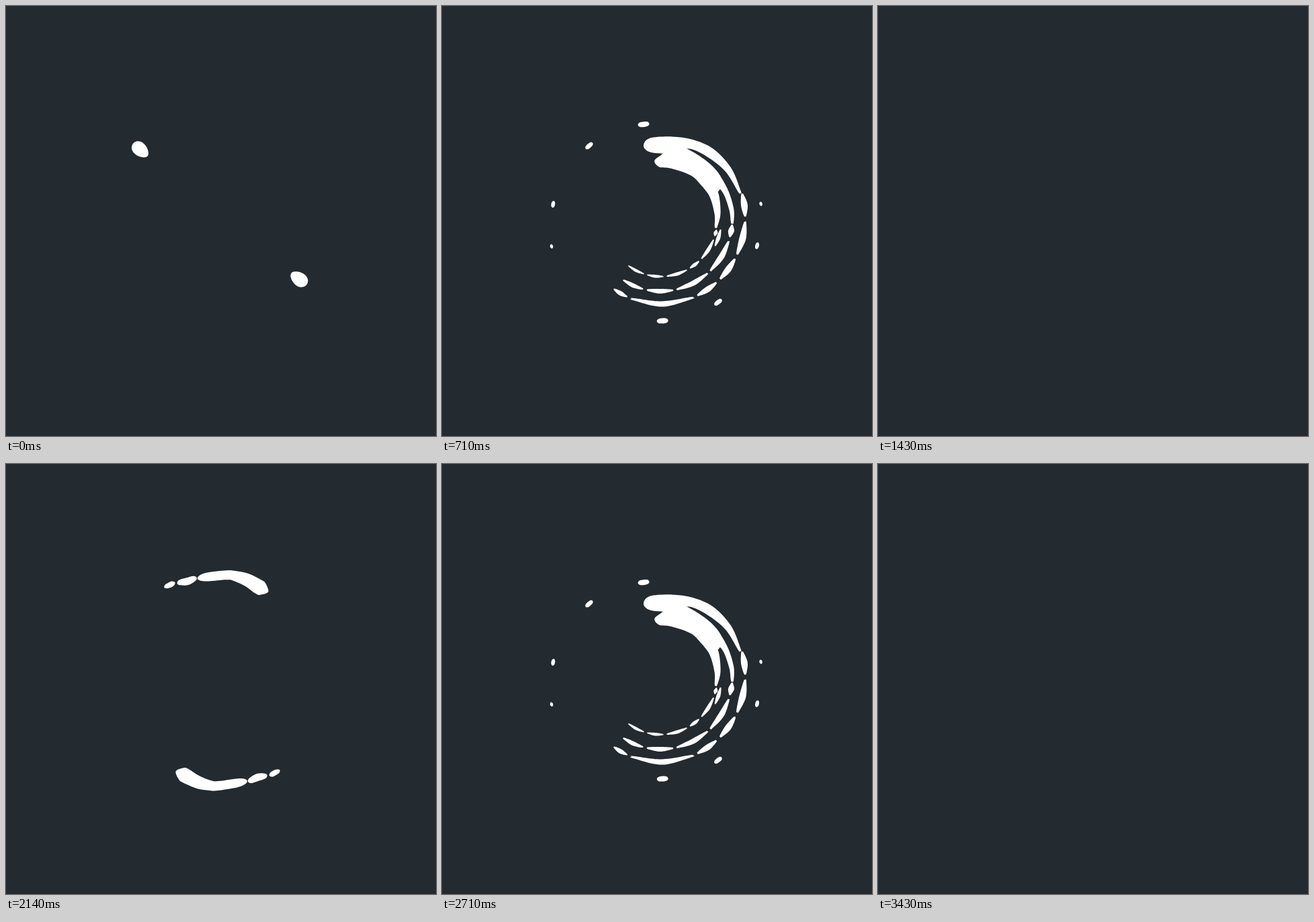
An HTML page for the animation above (4 s loop, 640 by 640 pixels).

```html
<!DOCTYPE html>
<html lang="en">
<head>
<meta charset="utf-8">
<title>Ink swirl</title>
<style>
  html, body { margin: 0; width: 100%; height: 100%; overflow: hidden; background: #232a30; }
  svg { display: block; width: 100%; height: 100%; }
</style>
</head>
<body>
<svg viewBox="0 0 640 640"><path id="ink" fill="#fff"/></svg>
<script>
const CX = 318, CY = 322, RAD = Math.PI / 180;
const LOOP = 2000, RATE = 14, LAST = 20;
const OPPOSITE = 183;

const polar = (deg, r) => [CX + r * Math.cos(deg * RAD), CY + r * Math.sin(deg * RAD)];

// A ribbon is a bent streak: key points of angle, radius and width.
const ribbon = text => text.split(',').map(p => p.trim().split(' ').map(Number));

// A spiral ring that breaks into tapered dashes at the given angles.
const ring = (radius, width, gap, cuts) => cuts.slice(1).map((end, i) => {
  const from = cuts[i] + gap / 2, to = end - gap / 2;
  const w = width * (1 - Math.max(0, from) / 350);
  return [[from, .4], [(from + to) / 2, 1], [to, .4]].map(([deg, k]) => [deg, radius - .13 * deg, w * k]);
});

const brush = { ref: 78, ribbons: [
  ribbon('80 111.5 15, 95 107 28, 120 102 36, 140 101 33, 156 107 18, 180 113 10, 194 115 8, 205 115 4'),
  ribbon('89 87 16, 106 84 24, 130 88 34, 150 86 29, 159 79 16, 168 75 8, 185 73 5, 200 76 4, 209 75.5 2.5'),
  ribbon('145 98 24, 157 94 20, 168 94 8, 182 94 6, 196 95.5 8, 210 97 4.5'),
  ribbon('170 81.5 3, 176 81.5 4, 182 81.5 3'),
  ribbon('209 82.5 2.5, 211 82.5 2.5')
] };

const swirl = { ref: -98, ribbons: [
  ribbon('-94 115 21, -79 117.5 25, -66 127.5 15, -52 131.5 15, -36 133.5 10, -20 133 4'),
  ribbon('-86 91 17, -74 101 35, -52 103 31, -34 103.5 29'),
  ribbon('-40 110 16, -25 113.5 9, -10 114.5 7, 0 114 4'),
  ribbon('-40 97 17, -25 96 14, -8 93 9, 4 90 4'),
  ...ring(133, 10, 5, [-20, -2, 23, 43, 62, 109, 124]),
  ...ring(114, 9, 5, [0, 13, 43, 74, 99, 121]),
  ...ring(92, 6, 5, [5, 15, 40, 55, 80, 101, 124]),
  ...ring(98, 6, 4, [5, 23])
] };

const drop = { ref: 212, ribbons: [
  ribbon('158.5 149 8, 165 149 13, 180 151 14, 186 151 15, 196 149 19, 207 145 22, 211 144.5 19'),
  ribbon('142 151 8, 148 149 11, 154 150 8'),
  ribbon('131 154.5 6, 134 154 8, 137 154 7')
] };

const flecks = { ref: 0, ribbons: [263, 229, 190, 167].map((deg, i) => {
  const half = 2 - .5 * i;
  return [[deg - half, 147 + 4 * i, 7 - i], [deg + half, 147 + 4 * i, 7 - i]];
}) };

function smooth(points) {
  const n = points.length, at = i => points[(i + n) % n];
  const fmt = (x, y) => x.toFixed(2) + ' ' + y.toFixed(2) + ' ';
  let d = 'M' + fmt(...at(0));
  for (let i = 0; i < n; i++) {
    const [a, b, c, e] = [at(i - 1), at(i), at(i + 1), at(i + 2)];
    d += 'C' + fmt(b[0] + (c[0] - a[0]) / 6, b[1] + (c[1] - a[1]) / 6)
      + fmt(c[0] - (e[0] - b[0]) / 6, c[1] - (e[1] - b[1]) / 6) + fmt(...c);
  }
  return d + 'Z';
}

// Turns a drawing to its head angle; wear(offset) takes width off along the way.
function draw({ ref, ribbons }, { head, stretch = 1, grow = 1, wear = () => 0 }) {
  return ribbons.map(keys => {
    const line = keys
      .map(([deg, r, w]) => [head + (deg - ref) * stretch, r * grow, w - wear(deg - ref)])
      .filter(p => p[2] > .3);
    if (!line.length) return '';
    const edge = side => line.map(([deg, r, w]) => polar(deg, r + side * w / 2));
    const tip = ([deg, r, w], way) => polar(deg + way * .48 * w / r / RAD, r);
    return smooth([...edge(1), tip(line[line.length - 1], 1), ...edge(-1).reverse(), tip(line[0], -1)]);
  }).join('');
}

// An egg with its broad end pointing away from the centre.
function egg(deg, r) {
  const points = Array.from({ length: 12 }, (_, i) => {
    const a = i * 30 * RAD, out = r + 14.3 * Math.cos(a);
    const across = 10 * Math.sin(a) * (1 + .2 * Math.cos(a));
    return polar(deg + across / out / RAD, out);
  });
  return smooth(points);
}

// Clockwise turn of the outer drops, slowing down.
const outerTurn = k => 17.6 * (k - 6) - 1.79 * (k - 6) ** 2;

function outer(k) {
  if (k === 0) return egg(222.5, 160) + egg(35.5, 145);
  const early = Math.max(0, 1 - k / 6);
  const [shape, pose] = k < 9
    ? [drop, {
        head: drop.ref + outerTurn(k),
        stretch: 1 - .7 * early ** 2,
        grow: 1 + .06 * early,
        wear: () => 2.5 * Math.max(0, k - 6)
      }]
    : [flecks, { head: outerTurn(Math.min(k, 11)) - outerTurn(10), wear: () => 2 * (k - 10) }];
  return draw(shape, pose) + draw(shape, { ...pose, head: pose.head + OPPOSITE });
}

// The stroke sweeps anticlockwise, then coasts to a stop while it wears away.
function stroke(k) {
  if (k < 3) return '';
  if (k < 7) return draw(brush, { head: brush.ref + 44 * (6 - k), stretch: 1 - .25 * (6 - k) });
  const ahead = Math.max(0, 10 - k), past = Math.max(0, k - 10);
  return draw(swirl, {
    head: swirl.ref + 45 * ahead - 54 * (1 - Math.exp(-past / 2.5)),
    stretch: 1 - .09 * ahead + .4 * Math.sin(Math.PI * past / 10),
    wear: offset => past ** 2 / 4 + past * offset / 120 - .6 * ahead
  });
}

// Drawings change on whole hundredths of a second.
const starts = Array.from({ length: LAST + 1 }, (_, k) => Math.round(k * 100 / RATE) * 10);
const ink = document.getElementById('ink');
let shown = -1;

function render(time) {
  const t = time % LOOP;
  const k = starts.filter(s => s <= t).length - 1;
  if (k === shown) return;
  shown = k;
  ink.setAttribute('d', k < LAST ? outer(k) + stroke(k) : '');
}

function tick() {
  render(performance.now());
  requestAnimationFrame(tick);
}
tick();
</script>
</body>
</html>
```
